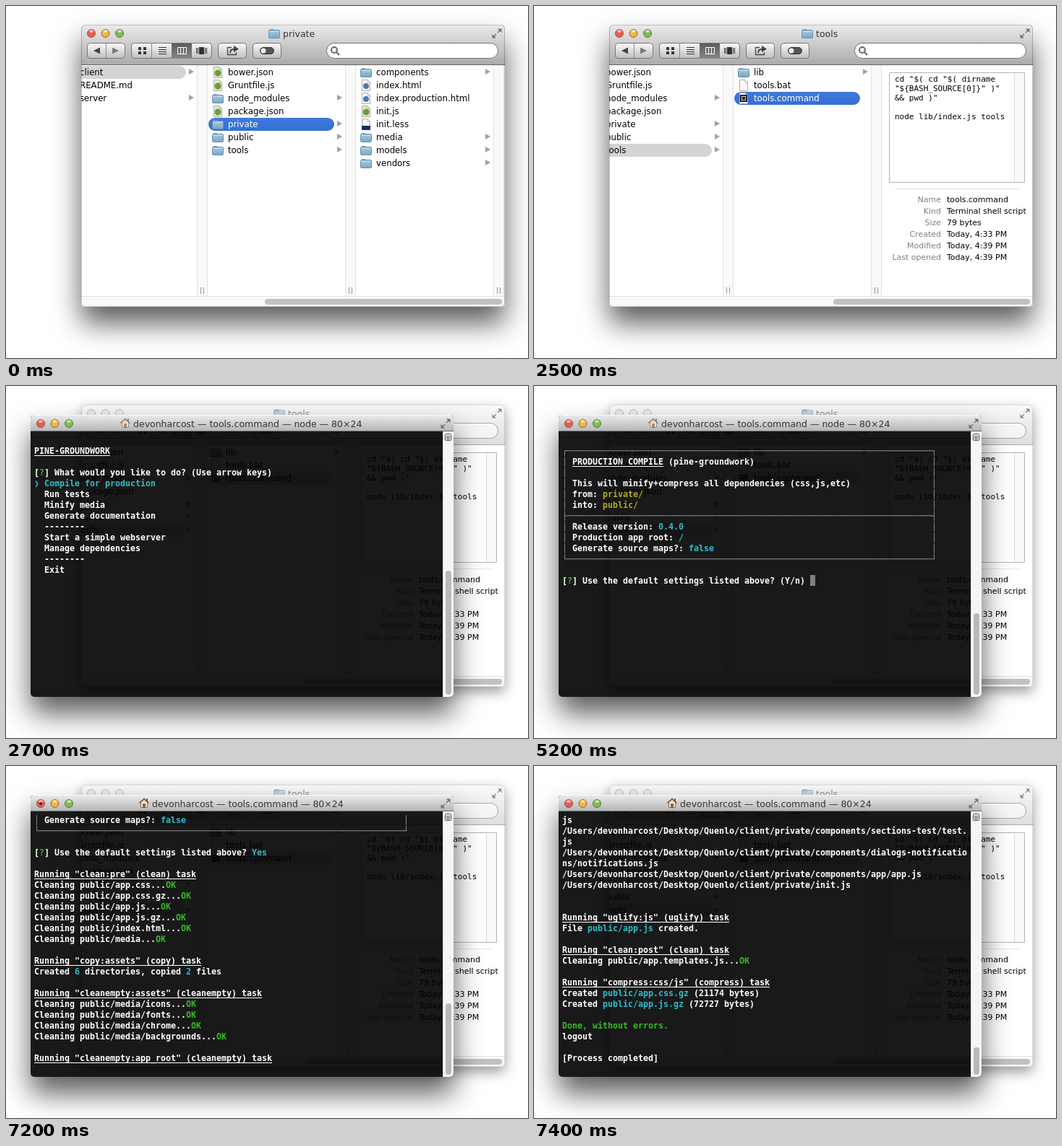
Recreate the animation shown at these times as an HTML page with a canvas. Size 722 px wide and 488 px high, loop 8 s.

```html
<!DOCTYPE html>
<html lang="en">
<head>
<meta charset="utf-8">
<title>Build tool session</title>
<style>
  html, body { margin: 0; width: 100%; height: 100%; overflow: hidden; background: #fff; }
  canvas { display: block; }
</style>
</head>
<body>
<canvas id="stage" width="722" height="488"></canvas>
<script>
const c = document.getElementById('stage').getContext('2d');
const LOOP = 8000;
const SANS = '"DejaVu Sans", sans-serif';
const MONO = '"DejaVu Sans Mono", monospace';

// ---- Drawing helpers ----
function rect(x, y, w, h, fill) {
  c.fillStyle = fill;
  c.fillRect(x, y, w, h);
}
function round(x, y, w, h, r, fill, stroke) {
  c.beginPath();
  c.roundRect(x, y, w, h, r);
  if (fill) { c.fillStyle = fill; c.fill(); }
  if (stroke) { c.strokeStyle = stroke; c.lineWidth = 1; c.stroke(); }
}
function poly(points, fill) {
  c.beginPath();
  for (let i = 0; i < points.length; i += 2) c.lineTo(points[i], points[i + 1]);
  c.closePath();
  c.fillStyle = fill;
  c.fill();
}
function circle(x, y, r, fill, stroke, width = 1) {
  c.beginPath();
  c.arc(x, y, r, 0, 7);
  if (fill) { c.fillStyle = fill; c.fill(); }
  if (stroke) { c.strokeStyle = stroke; c.lineWidth = width; c.stroke(); }
}
function line(points, stroke, width = 1) {
  c.beginPath();
  for (let i = 0; i < points.length; i += 2) c.lineTo(points[i], points[i + 1]);
  c.strokeStyle = stroke;
  c.lineWidth = width;
  c.stroke();
}
function shade(y0, y1, top, bottom) {
  const g = c.createLinearGradient(0, y0, 0, y1);
  g.addColorStop(0, top);
  g.addColorStop(1, bottom);
  return g;
}
function text(str, x, y, font, fill = '#000', align = 'left') {
  c.font = font;
  c.fillStyle = fill;
  c.textAlign = align;
  c.fillText(str, x, y);
}

// ---- Icons ----
function folder(x, y) {
  round(x + 1, y + 2, 7, 5, 1.5, '#7fa6c1');
  round(x + .5, y + 3.5, 15, 11, 1.5, shade(y + 3, y + 15, '#a9cbe0', '#78a5c4'), '#6791ad');
  rect(x + 1, y + 5, 14, 1, '#c3dcea');
}
function page(x, y, fill) {
  poly([x + 2.5, y + .5, x + 10, y + .5, x + 13.5, y + 4, x + 13.5, y + 15.5, x + 2.5, y + 15.5], fill);
  c.strokeStyle = '#aaa';
  c.lineWidth = 1;
  c.stroke();
  line([x + 10, y + .5, x + 10, y + 4, x + 13.5, y + 4], '#bbb');
}
function fileIcon(name, x, y) {
  const ext = name.split('.').pop();
  if (ext === name) return folder(x, y);
  page(x, y, /js/.test(ext) ? '#e3ecc9' : '#fbfbfb');
  if (/js/.test(ext)) circle(x + 8, y + 9, 4.5, '#6d9c3c');
  if (ext === 'html') circle(x + 8, y + 9, 4, '#4a78b5');
  if (ext === 'less') rect(x + 2, y + 10, 12, 6, '#1c2c5e');
  if (ext === 'command') {
    rect(x + 3, y + 3, 10, 10, '#222');
    rect(x + 5, y + 5, 6, 6, '#ccc');
    rect(x + 6, y + 6, 4, 4, '#222');
  }
}
function house(x, y) {
  rect(x + 10, y + 1, 2, 4, '#8a5a3c');
  rect(x + 2, y + 6, 10, 8, '#f3ead9');
  line([x + 2.5, y + 6, x + 2.5, y + 13.5, x + 11.5, y + 13.5, x + 11.5, y + 6], '#7d6a58');
  rect(x + 5, y + 8, 4, 6, '#8a5a3c');
  line([x + .5, y + 7.5, x + 7, y + 1.5, x + 13.5, y + 7.5], '#6b4a38', 1.6);
}
function expandIcon(x, y) {
  line([x - 5, y + 5, x - 1, y + 1], '#707070', 1.4);
  line([x + 1, y - 1, x + 5, y - 5], '#707070', 1.4);
  poly([x - 6.5, y + 6.5, x - 6.5, y + 1, x - 1, y + 6.5], '#707070');
  poly([x + 6.5, y - 6.5, x + 6.5, y - 1, x + 1, y - 6.5], '#707070');
}

// ---- Window chrome ----
function windowBase(x, y, w, h, active, fill) {
  c.save();
  c.shadowColor = `rgba(0,0,0,${active ? .64 : .4})`;
  c.shadowBlur = active ? 38 : 18;
  c.shadowOffsetY = active ? 23 : 7;
  // Keep the interior clear so a translucent window shows what lies behind it.
  c.beginPath();
  c.rect(0, 0, 722, 488);
  c.roundRect(x, y, w, h, 5);
  c.clip('evenodd');
  round(x, y, w, h, 5, '#777');
  c.restore();
  c.save();
  c.beginPath();
  c.roundRect(x, y, w, h, 5);
  c.clip();
  rect(x, y, w, h, fill);
}
function titleBar(x, y, w, label, icon, { active = true, iconAlpha = 1, busy = false }) {
  ['#ee5a50', '#f3b540', '#7cbf4f'].forEach((color, i) => {
    const cx = x + 14 + i * 19.5;
    circle(cx, y + 12, 5.5, active ? color : '#e6e6e6', active ? 'rgba(70,40,20,.55)' : '#999');
    if (active) {
      c.beginPath();
      c.ellipse(cx, y + 9, 3, 1.8, 0, 0, 7);
      c.fillStyle = 'rgba(255,255,255,.6)';
      c.fill();
    }
  });
  if (busy) circle(x + 14, y + 12, 2, '#5c1410');
  const font = '12.5px ' + SANS;
  c.font = font;
  const gap = icon === folder ? 20 : 18;
  const left = Math.round(x + w / 2 - 1.5 - (c.measureText(label).width + gap) / 2);
  c.globalAlpha = iconAlpha;
  icon(left, y + 4);
  c.globalAlpha = 1;
  text(label, left + gap, y + 17, font, active ? '#333' : '#8a8a8a');
  c.globalAlpha = active ? 1 : .75;
  expandIcon(x + w - 11, y + 12);
  c.globalAlpha = 1;
}

// ---- File browser ----
const FILES = {
  root: ['client', 'README.md', 'server'],
  client: ['bower.json', 'Gruntfile.js', 'node_modules', 'package.json', 'private', 'public', 'tools'],
  private: ['components', 'index.html', 'index.production.html', 'init.js', 'init.less', 'media', 'models', 'vendors'],
  tools: ['lib', 'tools.bat', 'tools.command']
};

function toolbar() {
  const button = (x, w) => round(x + .5, 51.5, w - 1, 21, 4, shade(51, 73, '#fbfbfb', '#bdbdbd'), '#757575');
  button(112, 53);
  rect(138, 52, 1, 21, '#8c8c8c');
  poly([121, 62, 130, 57.5, 130, 66.5], '#444');
  poly([156, 62, 147, 57.5, 147, 66.5], '#7a7a7a');

  button(173, 112);
  rect(229, 52, 28, 21, shade(52, 73, '#5c5c5c', '#858585'));
  rect(201, 52, 1, 21, '#8c8c8c');
  for (let i = 0; i < 4; i++) {
    rect(183 + (i % 2) * 7, 57 + (i >> 1) * 6, 4, 4, '#333');
    rect(211, 57 + i * 3, 11, 1, '#333');
  }
  c.strokeStyle = '#fff';
  for (let i = 0; i < 3; i++) c.strokeRect(237.5 + i * 4, 57.5, 4, 9);
  rect(267, 57, 7, 10, '#333');
  [263, 265, 275, 277].forEach(x => rect(x, 58, 1, 8, '#333'));

  button(293, 40);
  line([312, 57.5, 306.5, 57.5, 306.5, 67.5, 318.5, 67.5, 318.5, 64], '#444', 1.3);
  line([310, 65, 311, 61, 316, 59.5], '#444', 2);
  poly([315, 55, 322, 59.5, 315, 64], '#444');

  button(341, 40);
  round(351.5, 57.5, 19, 9, 4.5, '#555', '#333');
  circle(356, 62, 3.5, '#f2f2f2');

  round(443.5, 51.5, 237, 21, 10.5, '#fff', '#777');
  circle(454, 61, 4, null, '#666', 2);
  line([457, 64, 461, 68], '#666', 2.2);
}

function track(x) {
  rect(x, 82, 14, 320, '#f9f9f9');
  rect(x, 82, 1, 320, '#e2e2e2');
  rect(x + 14, 82, 1, 320, '#e2e2e2');
  rect(x + 5, 390, 1, 9, '#999');
  rect(x + 9, 390, 1, 9, '#999');
}

function column(x, files, selected, highlight) {
  track(x + 191);
  files.forEach((name, i) => {
    const y = 91 + 18 * i;
    const on = name === selected;
    const blue = on && highlight;
    if (on) round(x + 2, y - 8, 174, 18, 9, blue ? shade(y - 8, y + 10, '#4079dc', '#346fd2') : '#d4d4d4');
    fileIcon(name, x + 7, y - 7);
    text(name, x + 29, y + 5, '11.75px ' + SANS, blue ? '#fff' : '#000');
    if (!name.includes('.')) poly([x + 180, y - 4, x + 187, y, x + 180, y + 4], '#a2a2a2');
  });
}

function preview() {
  round(491.5, 92.5, 187, 152, 0, '#fff', '#b4b4b4');
  rect(664, 93, 14, 151, '#f8f8f8');
  rect(664, 93, 1, 151, '#dedede');
  ['cd "$( cd "$( dirname', '"${BASH_SOURCE[0]}" )"', '&& pwd )"', '', 'node lib/index.js tools']
    .forEach((s, i) => text(s, 499, 105 + 13 * i, '11px ' + MONO));
  rect(499, 253, 172, 1, '#e4e4e4');
  const info = {
    Name: 'tools.command', Kind: 'Terminal shell script', Size: '79 bytes',
    Created: 'Today, 4:33 PM', Modified: 'Today, 4:39 PM', 'Last opened': 'Today, 4:39 PM'
  };
  Object.entries(info).forEach(([label, value], i) => {
    const y = 272 + 16 * i;
    text(label, 563, y, '11px ' + SANS, '#808080', 'right');
    text(value, 571, y, '11px ' + SANS);
  });
}

// columns: [x, folder, selected item]; the last selection has the focus.
function browser(title, columns, { active = true, showPreview = false, thumb = 358 } = {}) {
  windowBase(104, 26, 586, 391, active, '#fff');
  const focus = columns.findLast(col => col[2]);
  columns.forEach(col => column(col[0], FILES[col[1]], col[2], active && col === focus));
  if (showPreview) preview();

  rect(104, 402, 586, 15, '#f9f9f9');
  rect(104, 402, 586, 1, '#e0e0e0');
  round(thumb, 406, 686 - thumb, 8, 4, '#c1c1c1');

  rect(104, 26, 586, 56, active ? shade(26, 81, '#ebebeb', '#ababab') : shade(26, 81, '#fafafa', '#dedede'));
  rect(104, 26, 586, 1, '#f8f8f8');
  rect(104, 81, 586, 1, active ? '#666' : '#aaa');
  c.globalAlpha = active ? 1 : .6;
  toolbar();
  titleBar(104, 26, 586, title, folder, { active, iconAlpha: active ? 1 : .5 });
  c.restore();
  round(104.5, 26.5, 585, 390, 5, null, `rgba(0,0,0,${active ? .22 : .12})`);
}

// ---- Terminal ----
const COLORS = { c: '#30bccb', g: '#35bb25', y: '#b2ae1e', d: '#929292', u: '#fff' };
const CELL = 7, ROW = 15;

// Markup: {x text} sets colour x, {u text} underlines.
function terminalLine(source, row) {
  let x = 39;
  const y = 79 + ROW * row;
  for (const [whole, style, inner] of source.matchAll(/\{(\w) (.*?)\}|[^{]+/g)) {
    const str = inner ?? whole;
    text(str, x, y, (style === 'd' ? '' : 'bold ') + '11.63px ' + MONO, COLORS[style] || '#fff');
    if (style === 'u') rect(x, y + 2, str.length * CELL, 1, '#fff');
    x += str.length * CELL;
  }
}

function terminal(lines, { title = USER + ' — tools.command — 80×24', thumb, iconAlpha, busy, cursor }) {
  browser('tools', TOOLS_COLUMNS, { active: false, showPreview: true, thumb: 414 });
  windowBase(34, 40, 585, 391, true, 'rgba(0,0,0,.9)');
  rect(34, 40, 585, 23, shade(40, 62, '#ececec', '#b6b6b6'));
  rect(34, 40, 585, 1, '#f8f8f8');
  rect(34, 62, 585, 1, '#6c6c6c');
  titleBar(34, 40, 585, title, house, { iconAlpha, busy });

  rect(604, 63, 15, 368, '#f5f5f5');
  rect(604, 63, 1, 368, '#d8d8d8');
  round(607.5, 66.5, 8, 9, 1, '#fff', '#444');
  [69, 71, 73].forEach(y => rect(609, y, 5, 1, '#444'));
  round(608, thumb, 8, 428 - thumb, 4, '#b9b9b9');

  lines.forEach(terminalLine);
  if (cursor) rect(39 + cursor[0] * CELL, 67 + cursor[1] * ROW, CELL, ROW, '#808080');
  c.restore();
}

const USER = 'devonharcost';
const HOME = `/Users/${USER}/Desktop/Quenlo/client/private`;
const PARTS = HOME + '/components';
const TOOLS_COLUMNS = [[70, 'client', 'tools'], [275, 'tools', 'tools.command']];

const border = (left, right) => `{d ${left}${'─'.repeat(72)}${right}}`;
const boxed = (source = '') => {
  const length = source.replace(/\{\w (.*?)\}/g, '$1').length;
  return `{d │} ${source}${' '.repeat(71 - length)}{d │}`;
};
const task = (name, kind) => `{u Running "${name}" (${kind}) task}`;
const clean = path => `Cleaning public/${path}...{g OK}`;

const heading = ['', '{u PINE-GROUNDWORK}', ''];
const question = '[{g ?}] What would you like to do? ';
const menu = [...heading, question + '(Use arrow keys)', '{c ❯ Compile for production}',
  ...['Run tests', 'Minify media', 'Generate documentation', '--------',
    'Start a simple webserver', 'Manage dependencies', '--------', 'Exit'].map(s => '  ' + s)];
const chosen = [...heading, question + '{c Compile for production}'];

const sourceMaps = boxed('Generate source maps?: {c false}');
const defaults = '[{g ?}] Use the default settings listed above? ';
const settings = ['', border('┌', '┐'),
  boxed('{u PRODUCTION COMPILE} (pine-groundwork)'), boxed(),
  boxed('This will minify+compress all dependencies (css,js,etc)'),
  boxed('from: {y private/}'), boxed('into: {y public/}'),
  border('├', '┤'),
  boxed('Release version: {c 0.4.0}'), boxed('Production app root: {c /}'), sourceMaps,
  border('└', '┘'), '', defaults + '(Y/n)'];

const cleaning = [sourceMaps, border('└', '┘'), '', defaults + '{c Yes}', '',
  task('clean:pre', 'clean'),
  ...['app.css', 'app.css.gz', 'app.js', 'app.js.gz', 'index.html', 'media'].map(clean), '',
  task('copy:assets', 'copy'), 'Created {c 6} directories, copied {c 2} files', '',
  task('cleanempty:assets', 'cleanempty'),
  ...['icons', 'fonts', 'chrome', 'backgrounds'].map(s => clean('media/' + s)), '',
  task('cleanempty:app_root', 'cleanempty')];

const pathLines = [PARTS + '/sections-test/test.', 'js',
  PARTS + '/dialogs-notificatio', 'ns/notifications.js'];

const building = [...cleaning.slice(13), '',
  task('less:app', 'less'), 'File {c public/app.css} created.', '',
  task('copy:html', 'copy'), 'Copied {c 1} file', '',
  task('compile:js', 'compile'), ...pathLines];

const finished = ['js', ...pathLines, PARTS + '/app/app.js', HOME + '/init.js', '', '',
  task('uglify:js', 'uglify'), 'File {c public/app.js} created.', '',
  task('clean:post', 'clean'), clean('app.templates.js'), '',
  task('compress:css/js', 'compress'),
  'Created {c public/app.css.gz} (21174 bytes)', 'Created {c public/app.js.gz} (72727 bytes)', '',
  '{g Done, without errors.}', 'logout', '', '[Process completed]'];

// ---- Timeline ----
const prompting = { title: USER + ' — tools.command — node — 80×24', iconAlpha: .65 };
const browse = dir => browser(dir, [[73, 'root', 'client'], [278, 'client', dir], [483, dir]]);
const scenes = [
  [0, () => browse('private')],
  [500, () => browse('tools')],
  [2500, () => browser('tools', TOOLS_COLUMNS, { showPreview: true, thumb: 414 })],
  [2700, () => terminal(menu, { ...prompting, thumb: 256 })],
  [4700, () => terminal(chosen, { ...prompting, thumb: 256 })],
  [5200, () => terminal(settings, { ...prompting, thumb: 315, cursor: [49, 13] })],
  [7200, () => terminal(cleaning, { thumb: 329, busy: true })],
  [7300, () => terminal(building, { thumb: 360, busy: true })],
  [7400, () => terminal(finished, { thumb: 390 })]
];

let start, shown;
function tick(now) {
  start ??= now;
  const time = (now - start) % LOOP;
  const scene = scenes.findLast(s => s[0] <= time);
  if (scene !== shown) {
    shown = scene;
    rect(0, 0, 722, 488, '#fff');
    scene[1]();
  }
  requestAnimationFrame(tick);
}
requestAnimationFrame(tick);
</script>
</body>
</html>
```
